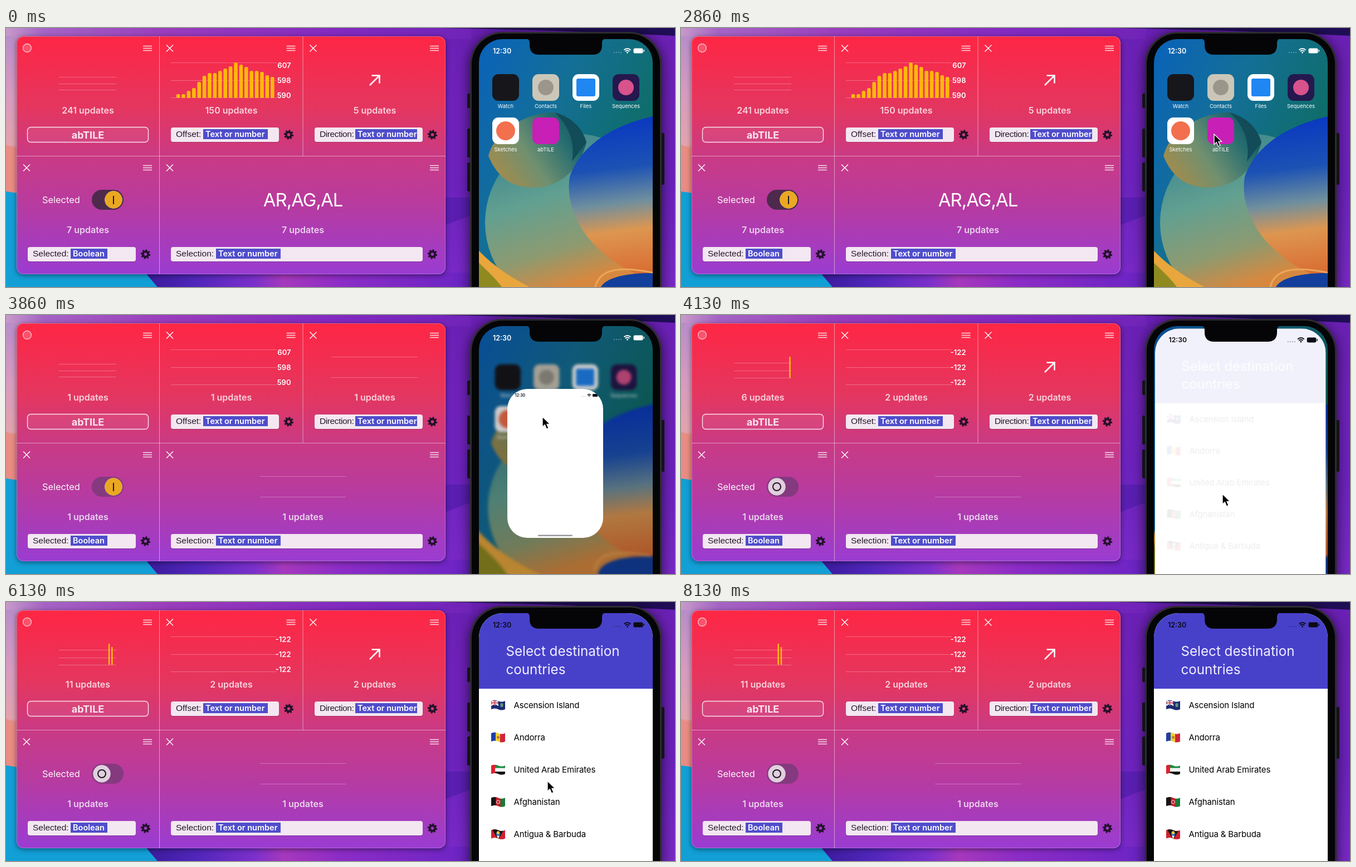
Write an HTML page that moves like this. It is 1201 px wide and 466 px high and loops after 8.23 s.

```html
<!DOCTYPE html>
<html lang="en">
<head>
<meta charset="utf-8">
<title>Live app updates</title>
<style>
html, body { margin: 0; width: 100%; height: 100%; overflow: hidden; background: #6c22bd; }
svg { display: block; width: 1201px; height: 466px; font-family: Inter, "Open Sans", sans-serif; }
.mid { text-anchor: middle; }
.count { font-size: 16px; font-weight: 600; fill: #fff; fill-opacity: .78; text-anchor: middle; }
.label { font: 15.5px "Liberation Sans", sans-serif; fill: #241a28; }
.token { font-size: 14.5px; font-weight: 600; fill: #fff; }
.axis { font-size: 13px; font-weight: 600; fill: #fff; text-anchor: end; }
.app { font-size: 9.5px; fill: #fff; text-anchor: middle; }
.faint { stroke: #fff; stroke-opacity: .28; fill: none; }
.row { font-size: 15px; letter-spacing: -.15px; }
</style>
</head>
<body>
<svg id="stage" viewBox="0 0 1201 466"></svg>
<script>
const rect = (x, y, w, h, fill, rx = 0, more = '') =>
  `<rect x="${x}" y="${y}" width="${w}" height="${h}" rx="${rx}" fill="${fill}" ${more}/>`;
const circle = (x, y, r, fill, more = '') => `<circle cx="${x}" cy="${y}" r="${r}" fill="${fill}" ${more}/>`;
const path = (d, fill, more = '') => `<path d="${d}" fill="${fill}" ${more}/>`;
const text = (x, y, s, more = '') => `<text x="${x}" y="${y}" ${more}>${s}</text>`;
const group = (more, ...parts) => `<g ${more}>${parts.join('')}</g>`;
const gradient = (id, line, ...stops) => {
  const [x1, y1, x2, y2] = line;
  return `<linearGradient id="${id}" gradientUnits="userSpaceOnUse" x1="${x1}" y1="${y1}" x2="${x2}" y2="${y2}">` +
    stops.map(([o, c]) => `<stop offset="${o}" stop-color="${c}"/>`).join('') + '</linearGradient>';
};

const defs = `<defs>
${gradient('top', [0, 0, 835, 0], [0, '#c79ac9'], [.08, '#a564c4'], [.35, '#9a3cbc'], [.7, '#842ac0'], [1, '#7024b8'])}
${gradient('left', [0, 0, 0, 300], [0, '#b48cc9'], [.4, '#d79bc0'], [.7, '#e2a3ae'], [.72, '#e58f86'], [1, '#e7788c'])}
${gradient('bottom', [255, 0, 835, 0], [0, '#3b1b9c'], [.15, '#5126bb'], [.33, '#7c30cb'], [.42, '#a638bc'], [.6, '#8c2cc6'], [1, '#6a24c4'])}
${gradient('side', [0, 0, 0, 466], [0, '#6a20b4'], [.3, '#6f22ba'], [.6, '#6c22bd'], [1, '#7a2ac8'])}
${gradient('panel', [0, 15, 0, 443], [0, '#ff2644'], [.3, '#e4365f'], [.5, '#ca3a84'], [.7, '#b83b9e'], [1, '#9a3cd2'])}
${gradient('sky', [849, 20, 1161, 170], [0, '#0a62ba'], [.5, '#146f96'], [1, '#0e6d66'])}
${gradient('dome', [880, 280, 1040, 170], [0, '#a98b48'], [.4, '#6f9070'], [.75, '#256c70'], [1, '#124f5e'])}
${gradient('globe', [920, 210, 1000, 466], [0, '#3d868e'], [.4, '#62a091'], [.75, '#8d9a70'], [1, '#d7883f'])}
${gradient('orb', [1075, 170, 1110, 450], [0, '#0a39c0'], [.3, '#1c52b4'], [.52, '#6f8f9e'], [.7, '#dd9650'], [1, '#d96a30'])}
<clipPath id="screen">${rect(849, 20, 312, 676, '#000', 42)}</clipPath>
<clipPath id="cardClip">${rect(849, 20, 312, 676, '#000', 44, 'id="cardEdge"')}</clipPath>
<clipPath id="wave"><path d="M0 2q6.5-3 12.5 0t12.5 0v15q-6.5 3-12.5 0t-12.5 0z"/></clipPath>
</defs>`;

const desktop = [
  rect(0, 0, 1201, 466, 'url(#side)'),
  rect(0, 0, 835, 20, 'url(#top)'),
  path('M780 0H1201V14Q1000 4 780 0Z', '#1f0e55'),
  rect(0, 14, 30, 300, 'url(#left)'),
  path('M0 210L30 224V300H0Z', '#e98c84'),
  path('M0 294L40 300 250 440 272 466H0Z', '#129fd6'),
  path('M250 440H840V466H272Z', 'url(#bottom)'),
  path('M785 305H840V335L785 356Z', '#5a1fb2'),
].join('');

const cross = (x, y) => path(`M${x - 6} ${y - 6}l12 12m0-12l-12 12`, 'none', 'stroke="#fff" stroke-width="1.4"');
const menu = (x, y) => path(`M${x - 8} ${y - 4}h16m-16 4h16m-16 4h16`, 'none', 'stroke="#fff" stroke-opacity=".82" stroke-width="1.3"');
const gear = (x, y) =>
  circle(x, y, 7.2, 'none', 'stroke="#22122b" stroke-width="3" pathLength="16" stroke-dasharray="1 1"') +
  circle(x, y, 4.7, 'none', 'stroke="#22122b" stroke-width="4"');
const field = (x, y, w, label, tokenX, tokenW, token, more = '') => group('',
  rect(x, y + 1, w, 26, '#0003', 4), rect(x, y, w, 26, '#f3e7f1', 4),
  text(x + 9, y + 17, label, 'class="label" ' + more),
  rect(tokenX, y + 3, tokenW, 18, '#4f4dcb'),
  text(tokenX + 4, y + 17, token, 'class="token"'),
  gear(x + w + 17.5, y + 13));

const tops = [119, 119, 113, 108, 97, 86, 81, 81, 77, 73, 69, 62, 66, 70, 77, 77, 79, 85, 88];
const bars = tops.map((y, i) => rect(305.8 + i * 9.4, y, 6.6, 126 - y, '#ffb70c', 2.5)).join('');
const counts = [[147, 154], [404.5, 154], [662, 154], [147, 369], [533, 369]];

const panel = [
  rect(19, 15, 770, 428, 'url(#panel)', 12, 'style="filter:drop-shadow(0 2px 5px #0007)"'),
  rect(19.5, 15.5, 769, 427, 'none', 12, 'stroke="#fff" stroke-opacity=".25"'),
  path('M275.5 15V443M533 15V230M19 230.5H789', 'none', 'stroke="#f3c9dc" stroke-opacity=".65"'),
  circle(38, 36, 7.5, '#fff', 'fill-opacity=".2" stroke="#fff" stroke-opacity=".65" stroke-width="1.3"'),
  cross(294, 36.5), cross(551.5, 36.5), cross(37, 251.5), cross(294, 251.5),
  menu(254, 36.5), menu(511.5, 36.5), menu(769, 36.5), menu(254, 251.5), menu(769, 251.5),
  ...counts.map(([x, y], i) => text(x, y, '', `id="count${i}" class="count"`)),
  path('', 'none', 'id="sparkLines" class="faint"'),
  rect(0, 75, 2.6, 38, '#ffb70c', 1, 'id="spark0"'), rect(0, 81, 2.6, 32, '#ffb70c', 1, 'id="spark1"'),
  rect(38.5, 178.5, 217, 27, '#ffffff10', 6, 'stroke="#fff" stroke-opacity=".85" stroke-width="1.4"'),
  text(147, 198.5, 'abTILE', 'class="mid" font-size="18" font-weight="700" fill="#fbe6ee"'),
  path('M296 62.5H486M296 94.5H486M296 125.5H486', 'none', 'class="faint"'),
  ...[72, 99, 126].map((y, i) => text(511.5, y, '', `id="axis${i}" class="axis"`)),
  group('id="bars"', bars),
  path('M653 103L670 86M656.5 85.5H670.5V99.5', 'none', 'id="arrow" stroke="#fff" stroke-width="2.6"'),
  path('M584 75.5H739M584 112.5H739', 'none', 'id="noArrow" class="faint"'),
  path('M456 290.5H610M456 327.5H610', 'none', 'id="noCodes" class="faint"'),
  text(533, 321, 'AR,AG,AL', 'id="codes" class="mid" font-size="33" letter-spacing="-1" fill="#fff"'),
  text(65, 315, 'Selected', 'font-size="16.4" fill="#fff" fill-opacity=".95"'),
  rect(154, 291, 57, 36, '#4d2a4d', 18, 'id="track"'),
  group('id="knob"',
    group('id="knobOff"', circle(0, 309, 15.7, '#e0d0de'), circle(0, 309, 7, 'none', 'stroke="#20141f" stroke-width="2"')),
    group('id="knobOn"', circle(0, 309, 15.7, '#eaa822'), rect(-1, 302, 2, 15, '#20141f'))),
  field(296, 179, 194, 'Offset:', 354, 116, 'Text or number'),
  field(554, 179, 194, 'Direction:', 627, 111, 'Text or number', 'letter-spacing="-.4"'),
  field(39, 394, 194, 'Selected:', 116, 66, 'Boolean'),
  field(296, 394, 452, 'Selection:', 377, 116, 'Text or number'),
].join('');

const status = color => group(`fill="${color}"`,
  text(874, 45.5, '12:30', 'font-size="12.5" font-weight="600"'),
  ...[0, 1, 2, 3].map(i => circle(1092 + i * 4, 44, 1, color, 'opacity=".4"')),
  path('M1109.5 39.5q6-5 12 0M1111.7 42q3.8-3 7.6 0', 'none', `stroke="${color}" stroke-width="1.9"`),
  circle(1115.5, 44.3, 1.4, color),
  rect(1126.5, 36.5, 17, 9, color, 2.5), rect(1144.5, 39, 1.5, 4, color, .7));

const tile = (x, y, name, color, mark = '') =>
  group('', rect(x - 24, y - 24, 48, 48, color, 11), mark, text(x, y + 37, name, 'class="app"'));

const home = [
  rect(800, -20, 420, 540, 'url(#sky)'),
  circle(1020, 350, 160, 'url(#globe)'),
  path('M866 230C880 175 950 150 985 152C1015 160 1035 180 1042 206C1030 250 1000 285 950 287C905 288 880 265 866 230Z', 'url(#dome)'),
  path('M985 152C1015 160 1035 180 1042 206L1016 240C1022 205 1010 175 985 152Z', '#114c58'),
  path('M1220 150C1100 160 1030 210 1012 268C1000 340 1060 440 1220 470Z', 'url(#orb)'),
  path('M830 380C880 440 930 462 990 490H830Z', '#e8a63c'),
  path('M830 405C868 440 890 460 905 490H830Z', '#8f8a20'),
  path('M1070 490C1050 460 1090 430 1220 445V490Z', '#123f9c'),
  path('M1058 466C1065 434 1100 428 1161 440', 'none', 'stroke="#eba65a" stroke-width="3"'),
  tile(897, 107, 'Watch', '#17161b'),
  tile(969, 107, 'Contacts', '#cbc7b8', circle(969, 107, 14, '#9a968c')),
  tile(1041, 107, 'Files', '#fff', rect(1024, 91, 34, 32, '#1f86f2', 3)),
  tile(1113, 107, 'Sequences', '#24184e', circle(1113, 107, 14, '#d8528c')),
  tile(897, 185, 'Sketches', '#fff', circle(897, 185, 17, '#f2704e')),
  tile(969, 185, 'abTILE', '#c81fb6'),
].join('');

const stripes = (w, h, dx, dy, ...colors) => colors.map((c, i) => rect(i * dx, i * dy, w, h, c)).join('');
const countries = [
  ['Ascension Island', rect(0, 0, 25, 20, '#1d2a72') +
    path('M0 1L13 10M13 1L0 10M6.5 0V10M0 5.5H13', 'none', 'stroke="#fff" stroke-width="2.4"') +
    path('M6.5 0V10M0 5.5H13', 'none', 'stroke="#d0243a" stroke-width="1.4"') + rect(16.5, 6, 5, 7, '#5f9a78', 2)],
  ['Andorra', stripes(9, 20, 8, 0, '#1f3fa8', '#f6cf2e', '#d0243a') + circle(12.5, 9.5, 2.6, '#b9803a')],
  ['United Arab Emirates', stripes(25, 7, 0, 6.5, '#1c8a3f', '#f4f4f4', '#111') + rect(0, 0, 7, 20, '#e02030')],
  ['Afghanistan', stripes(9, 20, 8.4, 0, '#151515', '#c4202c', '#187a3a') + circle(12.5, 9.5, 3, 'none', 'stroke="#eee"')],
  ['Antigua &amp; Barbuda', rect(0, 0, 25, 20, '#d0202f') + path('M1 0H24L12.5 19Z', '#151515') +
    path('M8 7H17L15 12H10Z', '#2b74c8') + path('M10 12H15L12.5 18Z', '#fff') + circle(12.5, 6.5, 2.6, '#f6cf2e')],
];

const card = group('id="card"',
  rect(849, 20, 312, 676, '#fff'),
  group('id="content"',
    rect(849, 20, 312, 136, '#4741ca'),
    group('font-size="24.2" fill="#f2f0ff"', text(897.5, 97, 'Select destination'), text(897.5, 130, 'countries')),
    ...countries.map(([name, flag], i) => group(`transform="translate(0 ${i * 58.1})"`,
      group('transform="translate(871 176)" clip-path="url(#wave)"', flag),
      text(911.5, 191, name, 'class="row"')))),
  status('#0c0a14'));

const phone = [
  rect(828, 118, 8, 26, '#1b1a20', 2), rect(828, 181, 8, 52, '#1b1a20', 2),
  rect(828, 242, 8, 52, '#1b1a20', 2), rect(1174, 189, 8, 93, '#1b1a20', 2),
  rect(833, 7, 344, 720, '#2d2c31', 58, 'style="filter:drop-shadow(0 3px 12px #000a)"'),
  rect(836, 10, 338, 714, '#050507', 55),
  group('clip-path="url(#screen)"', group('id="home"', home), status('#fff'),
    group('id="cardBox" clip-path="url(#cardClip)"', card, rect(0, 0, 62, 2.4, '#9b979f', 1.2, 'id="homeBar"'))),
  path('M934 19H1076Q1070 20 1070 27V31Q1070 48 1053 48H957Q940 48 940 31V27Q940 20 934 19Z', '#050507'),
].join('');

const pointer = path('M0 0V18.5L4.3 14.6 7.4 22 11 20.5 7.9 13.3H13.6Z', '#000', 'id="pointer" stroke="#fff" stroke-width="1.3"');

document.getElementById('stage').innerHTML = defs + desktop + panel + phone + pointer;

const el = id => document.getElementById(id);
const set = (id, attrs) => { for (const k in attrs) el(id).setAttribute(k, attrs[k]); };
const show = (id, on) => set(id, { visibility: on ? 'visible' : 'hidden' });
const clamp = v => Math.max(0, Math.min(1, v));

const LOOP = 8230, OPEN = 3863, READY = 4130, STEP = 200 / 3;
// time, x, y of the pointer tip
const route = [[0, 1220, 262], [2064, 1220, 262], [2130, 1194, 260], [2863, 957, 191], [3400, 963, 183],
  [OPEN, 963, 183], [READY, 972, 322], [7330, 972, 322], [7590, 1215, 300], [LOOP, 1215, 300]];

function pointerAt(t) {
  const i = Math.max(1, route.findIndex(p => p[0] >= t));
  const [a, b] = [route[i - 1], route[i]];
  const u = (t - a[0]) / (b[0] - a[0]), k = u * (2 - u);
  return [a[1] + (b[1] - a[1]) * k, a[2] + (b[2] - a[2]) * k];
}

function drawPanel(t) {
  const opened = t >= OPEN, ready = t >= READY;
  const values = ready ? [t < 4930 ? 6 : 11, 2, 2, 1, 1] : opened ? [1, 1, 1, 1, 1] : [241, 150, 5, 7, 7];
  values.forEach((n, i) => el('count' + i).textContent = n + ' updates');
  [607, 598, 590].forEach((n, i) => el('axis' + i).textContent = ready ? '-122' : n);
  show('bars', !opened);
  show('codes', !opened);
  show('noCodes', opened);
  show('arrow', !opened || ready);
  show('noArrow', opened && !ready);

  set('sparkLines', { d: (ready ? [86.5, 100.5, 113.5] : [88.5, 100.5, 111.5]).map(y => `M95 ${y}H198`).join('') });
  const shifts = Math.floor((t - READY) / 1000);
  [0, 1].forEach(i => {
    show('spark' + i, ready && shifts >= i);
    set('spark' + i, { x: 194.2 - (shifts - i) * 5.2 });
  });

  const off = clamp((t - OPEN) / 200);
  set('track', { fill: opened ? '#85397f' : '#4d2a4d' });
  set('knob', { transform: `translate(${193 - 21 * off} 0)` });
  set('knobOn', { opacity: 1 - off });
}

function drawPhone(t) {
  const opening = t >= OPEN;
  show('cardBox', opening);
  el('home').style.cssText = opening
    ? 'filter:blur(3px) brightness(.8);transform-origin:1005px 250px;transform:scale(.965)' : '';
  if (!opening) return;
  const rest = t > 4460 ? 0 : Math.exp((OPEN - t) / 82);
  const x = 849 + 51 * rest, y = 20 + 113 * rest;
  const w = 312 - 140 * rest, h = 676 - 408 * rest, scale = w / 312;
  set('cardEdge', { x, y, width: w, height: h, rx: 44 - 8 * rest });
  set('card', { transform: `translate(${x} ${y}) scale(${scale}) translate(-849 -20)` });
  set('homeBar', { x: x + w / 2 - 31, y: y + h - 5.5 });
  set('content', { opacity: clamp((t - 4103) / 357) });
}

// The picture advances at 15 steps a second.
function frame(now) {
  const t = Math.round(2130 + Math.floor((now % LOOP - 2122) / STEP) * STEP);
  drawPanel(t);
  drawPhone(t);
  set('pointer', { transform: `translate(${pointerAt(Math.max(0, t))})` });
  requestAnimationFrame(frame);
}
frame(0);
</script>
</body>
</html>
```
